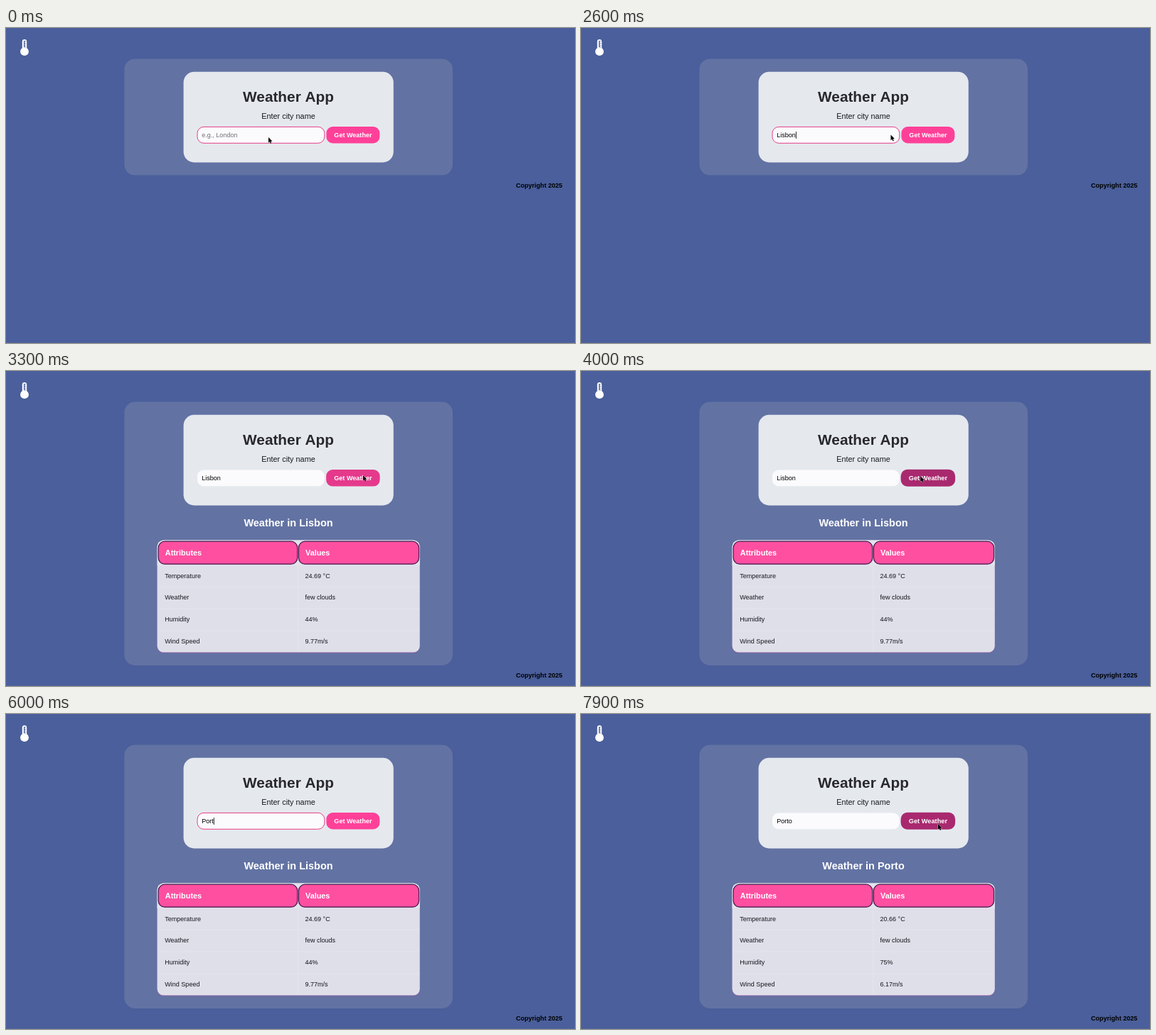
Recreate the animation shown at these times as an HTML page with a canvas. Size 800x444 px, loop 8000 ms.

```html
<!DOCTYPE html>
<html lang="en">
<head>
<meta charset="utf-8">
<title>Weather App</title>
<style>
  html, body { margin: 0; width: 100%; height: 100%; overflow: hidden; background: #4a5f9b; }
  canvas { display: block; width: 800px; height: 444px; }
</style>
</head>
<body>
<canvas id="stage" width="800" height="444"></canvas>
<script>
const ctx = document.getElementById('stage').getContext('2d');
const LOOP = 8000, STEP = 100;
const REM = 9.05;
const BLUE = '#4a5f9b';

// Each entry holds from its time until the next one.
const typing = [
  [0, ''], [1200, 'L'], [1400, 'Li'], [1600, 'Lis'], [1700, 'Lisb'], [1900, 'Lisbo'], [2000, 'Lisbon'],
  [5100, 'Lisbo'], [5200, 'Lis'], [5300, ''], [5400, 'P'], [5600, 'Po'], [5800, 'Por'],
  [6000, 'Port'], [6200, 'Porto']
];
const reports = [
  [0, null],
  [3300, { city: 'Lisbon', values: ['24.69 °C', 'few clouds', '44%', '9.77m/s'] }],
  [7100, { city: 'Porto', values: ['20.66 °C', 'few clouds', '75%', '6.17m/s'] }]
];
const focusStates = [[0, true], [2900, false], [4800, true], [6900, false]];
const pointerStates = [[0, true], [1200, false], [2300, true], [5100, false], [6300, true]];
const caretStates = [[0, false], [1200, true], [2900, false], [4800, true], [6900, false]];

// Eased between entries.
const pointerPath = [
  [0, 369, 154], [2300, 369, 154], [2900, 502, 147], [3800, 502, 147], [4400, 407, 152],
  [4500, 407, 152], [4800, 385, 151], [6300, 385, 151], [6800, 502, 155], [8000, 502, 155]
];
const hoverLevels = [
  [0, 0], [2600, 0], [2900, 1], [3299, 1], [3300, 0.3], [3500, 1], [4000, 1], [4300, 0],
  [6600, 0], [6900, 1], [7099, 1], [7100, 0.3], [7300, 1], [8000, 1]
];

function held(list, t) {
  return list.filter(([start]) => start <= t).pop()[1];
}

function eased(keys, t) {
  const next = Math.max(1, keys.findIndex(key => key[0] > t));
  const a = keys[next - 1], b = keys[next];
  const p = (t - a[0]) / (b[0] - a[0]);
  const k = p * p * (3 - 2 * p);
  return a.slice(1).map((v, i) => v + (b[i + 1] - v) * k);
}

function mix(from, to, k) {
  return `rgb(${from.map((v, i) => Math.round(v + (to[i] - v) * k)).join(',')})`;
}

function box(x, y, right, bottom, radius, fill, stroke, lineWidth = 1) {
  ctx.beginPath();
  ctx.roundRect(x, y, right - x, bottom - y, radius);
  ctx.fillStyle = fill;
  ctx.fill();
  if (stroke) {
    ctx.strokeStyle = stroke;
    ctx.lineWidth = lineWidth;
    ctx.stroke();
  }
}

function text(str, x, y, { size = 1, bold = false, color = '#17171c', align = 'left' } = {}) {
  ctx.font = `${bold ? 'bold ' : ''}${size * REM}px "Liberation Sans", Arial, sans-serif`;
  ctx.textAlign = align;
  ctx.fillStyle = color;
  ctx.fillText(str, x, y);
}

function drawThermometer() {
  box(22.8, 16, 29.2, 34, 3.2, '#fff');
  ctx.beginPath();
  ctx.arc(26, 33.2, 5.9, 0, Math.PI * 2);
  ctx.fill();
  ctx.fillStyle = BLUE;
  ctx.fillRect(25, 18, 1.2, 9);
  for (let y = 18.2; y < 27; y += 2.7) ctx.fillRect(26, y, 1.7, 1);
}

function drawInput(t) {
  const value = held(typing, t);
  box(269, 139.4, 447.8, 162.3, 9, '#fbfbfe', held(focusStates, t) ? '#e63c86' : null);
  text(value || 'e.g., London', 275.2, 153.8, { color: value ? '#000' : '#6f6f76' });
  if (value && held(caretStates, t)) {
    ctx.fillStyle = '#000';
    ctx.fillRect(275.3 + ctx.measureText(value).width, 146, 0.8, 10);
  }
}

function drawButton(t) {
  const [hover] = eased(hoverLevels, t);
  const scale = 1 + 0.02 * hover;
  ctx.save();
  ctx.translate(487.9, 150.8);
  ctx.scale(scale, scale);
  box(-37.5, -11.7, 37.5, 11.7, 9, mix([255, 64, 153], [169, 41, 111], hover));
  text('Get Weather', 0, 3.1, { bold: true, color: '#fff', align: 'center' });
  ctx.restore();
}

function drawReport({ city, values }) {
  text(`Weather in ${city}`, 397, 219.3, { size: 1.6, bold: true, color: '#fff', align: 'center' });
  box(212.6, 239.2, 581.8, 397.6, 9, '#8b5f9f');
  box(212.6, 238.6, 581.8, 396.6, 9, '#dfdfea');
  box(212.6, 238.6, 581.8, 274, [9, 9, 0, 0], '#e3e4ec');

  ctx.fillStyle = '#e4e4ed';
  ctx.fillRect(410, 274, 1.2, 122);
  for (let y = 303.5; y < 380; y += 30.9) ctx.fillRect(213, y, 368, 1.2);

  const head = { size: 1.2, bold: true, color: '#fff' };
  box(214.2, 240.2, 409.8, 272.2, 9, '#ff4fa1', '#40164a', 1.2);
  box(411.4, 240.2, 580.6, 272.2, 9, '#ff4fa1', '#40164a', 1.2);
  text('Attributes', 223.8, 260, head);
  text('Values', 421, 260, head);

  ['Temperature', 'Weather', 'Humidity', 'Wind Speed'].forEach((name, i) => {
    const y = 291.6 + i * 30.85;
    text(name, 223.2, y);
    text(values[i], 420.4, y);
  });
}

function drawPointer(t) {
  const [x, y] = eased(pointerPath, t);
  const outline = [[0, 0], [0, 7.8], [1.8, 6.2], [3, 8.9], [4.3, 8.3], [3.1, 5.8], [5.5, 5.7]];
  ctx.beginPath();
  outline.forEach(([dx, dy]) => ctx.lineTo(x + dx, y + dy));
  ctx.closePath();
  ctx.strokeStyle = 'rgba(255,255,255,.65)';
  ctx.lineWidth = 0.9;
  ctx.stroke();
  ctx.fillStyle = '#000';
  ctx.fill();
}

function draw(t) {
  const report = held(reports, t);
  ctx.fillStyle = BLUE;
  ctx.fillRect(0, 0, 800, 444);
  ctx.fillStyle = '#52659a';
  ctx.fillRect(0, 443, 800, 1);

  drawThermometer();
  box(166.4, 43.4, 628, report ? 415 : 207.6, 15, '#6272a3');
  box(249.6, 61.8, 544.8, 189.4, 15, '#e5e9ee');
  text('Weather App', 397, 104, { size: 2.3, bold: true, color: '#28282d', align: 'center' });
  text('Enter city name', 397, 127.7, { size: 1.2, align: 'center' });
  drawInput(t);
  drawButton(t);
  if (report) drawReport(report);
  text('Copyright 2025', 782.3, report ? 432.4 : 224.8, { bold: true, color: '#000', align: 'right' });
  if (held(pointerStates, t)) drawPointer(t);
}

const start = performance.now();
function tick() {
  const t = (performance.now() - start) % LOOP;
  draw(Math.floor(t / STEP) * STEP);
  requestAnimationFrame(tick);
}
tick();
</script>
</body>
</html>
```
